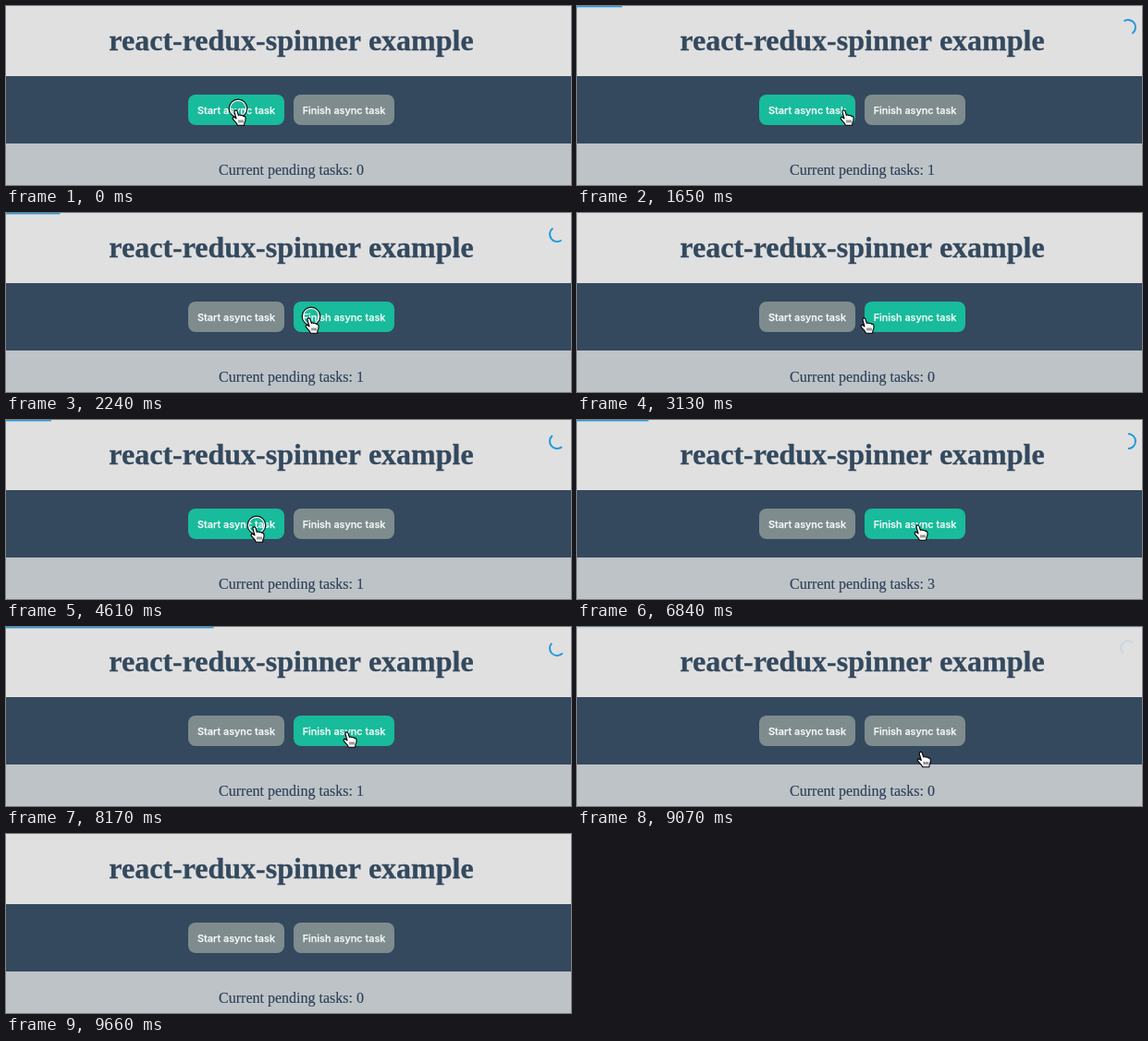
Write an HTML page with a canvas that moves like this. It is 611 px wide and 194 px high and loops after 9.91 s.

```html
<!DOCTYPE html>
<html lang="en">
<head>
<meta charset="utf-8">
<title>react-redux-spinner example</title>
<style>
html, body { margin: 0; width: 611px; height: 194px; overflow: hidden; }
canvas { display: block; }
</style>
</head>
<body>
<canvas id="stage" width="611" height="194"></canvas>
<script>
const W = 611, H = 194, LOOP = 9910, STEP = 148.5;
const ctx = document.getElementById('stage').getContext('2d');
const BLUE = '#2299dd', NAVY = '#34495e';

// Times are counted in steps of STEP ms.
const starts = [5, 26, 31, 36];
const finishes = [15, 47, 52, 57];
const glides = [
  { from: 7, to: 11, x: 291, y: 111 },
  { from: 11, to: 14, x: 330, y: 112 },
  { from: 18, to: 21, x: 313, y: 112 },
  { from: 21, to: 23, x: 271, y: 114 },
  { from: 41, to: 45, x: 371, y: 112 },
  { from: 60, to: 64, x: 384, y: 198 }
];

const clamp = v => Math.max(0, Math.min(1, v));
const lerp = (a, b, p) => a + (b - a) * p;
const easeOut = p => 1 - (1 - clamp(p)) ** 3;
const before = (list, n) => list.filter(t => t < n);
const pending = n => before(starts, n).length - before(finishes, n).length;

function cursorAt(n) {
  let x = 251, y = 111;
  for (const g of glides) {
    const p = clamp((n - g.from) / (g.to - g.from));
    x = lerp(x, g.x, p);
    y = lerp(y, g.y, p);
  }
  return { x, y };
}

// The latest stretch with pending tasks: its first start and its last finish.
function currentRun(n) {
  const first = before(starts, n).filter(t => pending(t) === 0).pop();
  if (first === undefined) return null;
  const last = finishes.find(t => t > first && pending(t + 1) === 0);
  return { first, last };
}

// Starts at 8 %, trickles every 800 ms, jumps on each finish, then fills up.
function progress({ first, last }, n) {
  const step = t => easeOut((n - t) / 1.35);
  let v = .08 * step(first);
  for (let t = first + 6; t < last; t += 5.4) v += .0155 * step(t);
  for (const t of finishes) if (t > first && t < last) v += .105 * step(t);
  return lerp(v, 1, step(last));
}

function text(str, x, y, font, color, weight = 0) {
  ctx.font = font;
  ctx.fillStyle = ctx.strokeStyle = color;
  ctx.textAlign = 'center';
  ctx.fillText(str, x, y);
  if (weight) {
    ctx.lineWidth = weight;
    ctx.strokeText(str, x, y);
  }
}

function button(label, x, w, cur) {
  const hot = cur.x >= x && cur.x < x + w && cur.y >= 96 && cur.y < 129;
  ctx.fillStyle = hot ? '#18bb9b' : '#7f8c8d';
  ctx.beginPath();
  ctx.roundRect(x, 96, w, 33, 8);
  ctx.fill();
  text(label, x + w / 2, 117, '500 10.9px Inter, sans-serif', '#f6f9f9', .25);
}

function loader(n) {
  const run = currentRun(n);
  if (!run) return;
  ctx.save();
  ctx.globalAlpha = clamp((run.last + 4.2 - n) / 1.8);
  ctx.fillStyle = ctx.strokeStyle = BLUE;
  const tip = progress(run, n) * W;
  ctx.fillRect(0, 0, tip, 1);
  ctx.globalAlpha *= .35;
  ctx.fillRect(0, 1, tip, 1);
  ctx.globalAlpha /= .35;

  const mid = (140 + 134.7 * (n - 31)) * Math.PI / 180;
  ctx.lineWidth = 2;
  ctx.beginPath();
  ctx.arc(596, 23, 8, mid - Math.PI / 2, mid + Math.PI / 2);
  ctx.stroke();
  ctx.restore();
}

const hand = new Path2D('M-2 11L-4 4Q-4.3 2.2-2.9 1.9Q-1.5 1.7-1 3.2L.4 7.5' +
  'Q2 6.4 3 7.8Q4.8 7 5.6 8.5Q7.8 8 8 10.3Q8.4 13 7 15.2L6.6 18.2H-.8L-1.4 16.3' +
  'Q-4 13.8-5.8 11.4Q-6.3 9.5-4.6 9.4Q-3.4 9.5-2 11Z');
const creases = new Path2D('M1 12.5V15.5M3 12.5V15.5M5 12.5V15.5');

function ring(r, color, width) {
  ctx.strokeStyle = color;
  ctx.lineWidth = width;
  ctx.beginPath();
  ctx.arc(0, 0, r, 0, Math.PI * 2);
  ctx.stroke();
}

function pointer(cur, pressed) {
  ctx.save();
  ctx.translate(cur.x, cur.y);
  if (pressed) {
    ring(8.8, '#fff', 1.6);
    ring(9.8, '#111', 1.2);
  }
  ctx.lineJoin = 'round';
  ctx.fillStyle = '#fff';
  ctx.strokeStyle = '#000';
  ctx.lineWidth = 1.1;
  ctx.fill(hand);
  ctx.stroke(hand);
  ctx.lineWidth = .8;
  ctx.stroke(creases);
  ctx.restore();
}

function band(y, h, color) {
  ctx.fillStyle = color;
  ctx.fillRect(0, y, W, h);
}

function draw(t) {
  const n = Math.floor(t / STEP);
  const cur = cursorAt(n);
  band(0, 76, '#e0e0e0');
  band(76, 73, NAVY);
  band(149, H - 149, '#bdc3c7');

  const serif = '"Liberation Serif", Times, serif';
  text('react-redux-spinner example', 308.5, 48, 'bold 32px ' + serif, NAVY, .3);
  text('Current pending tasks: ' + pending(n), 308.5, 183, '16px ' + serif, '#2f4058', .15);
  button('Start async task', 197, 104, cur);
  button('Finish async task', 311, 109, cur);

  loader(n);
  const pressed = n === 0 || starts.includes(n) || finishes.includes(n);
  pointer(cur, pressed);
}

const begin = performance.now();
function tick() {
  draw((performance.now() - begin) % LOOP);
  requestAnimationFrame(tick);
}
tick();
</script>
</body>
</html>
```
